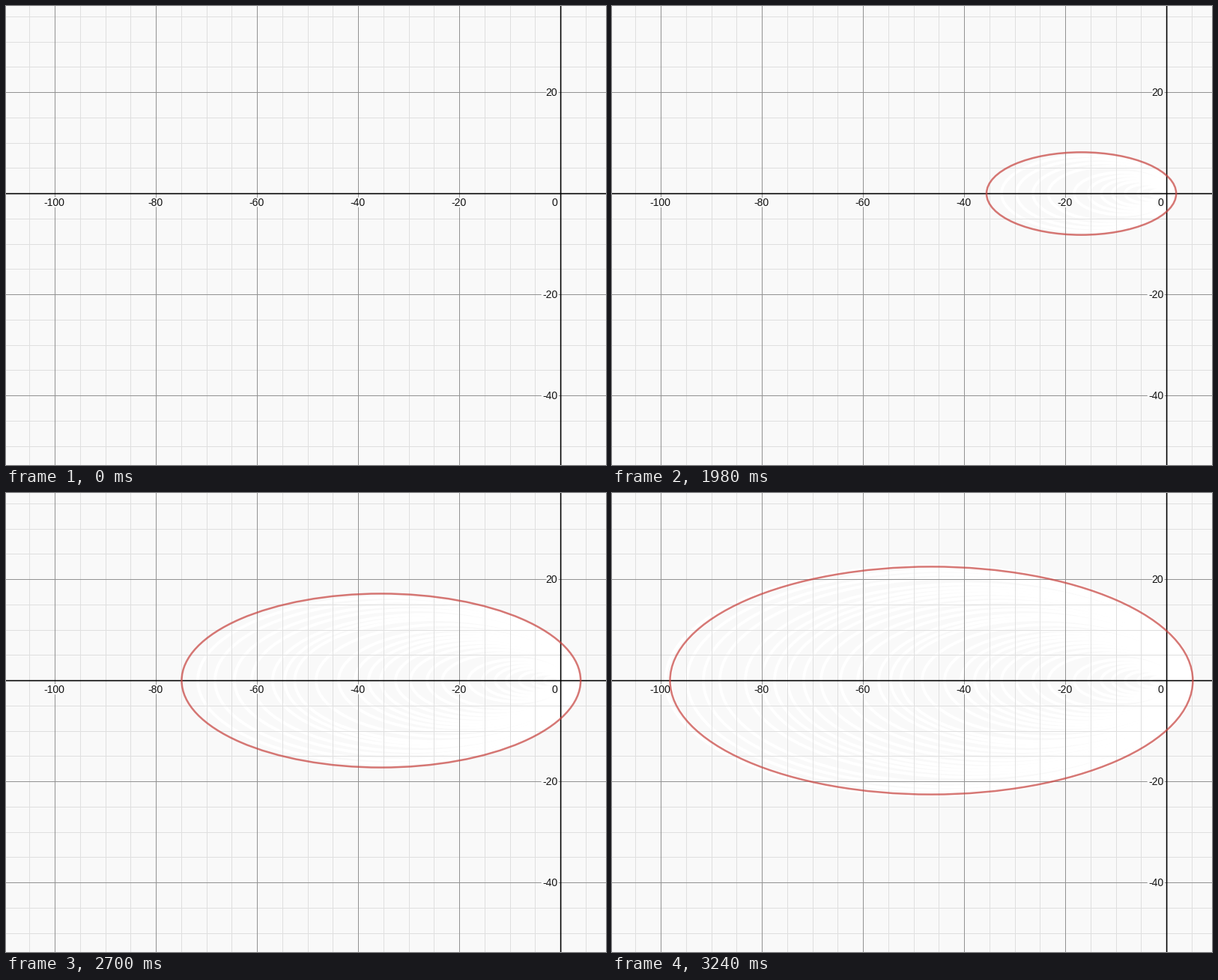
Animation of 801 by 613 pixels, one loop 3.3 s. Source, as a matplotlib script:

```python
import numpy as np
import matplotlib.pyplot as plt
from matplotlib.animation import FuncAnimation
from matplotlib.patches import Ellipse, Rectangle
from matplotlib.patheffects import Stroke

W, H, DPI = 801, 613, 64
PX = 72 / DPI                      # points per pixel
OX, OY, CELL = 740, 250, 33.75     # origin and minor grid step (5 units)
BG = "#f9f9f9"
STEP, TOTAL, START = 60, 55, 21
ECC = 0.9                          # one focus stays on the origin

# Left vertex of the ellipse at each step of the uneven slider.
LEFT = [736, 719, 702, 685, 668, 653, 636, 617, 582.5,
        562, 540, 520, 500, 484, 466, 444, 414, 385.5,
        372, 356, 328, 305, 279, 256, 234.5, 217, 199.5,
        178, 144, 122, 100, 78, 71.5, 77.5]

fig = plt.figure(figsize=(W / DPI, H / DPI), dpi=DPI, facecolor=BG)
ax = fig.add_axes([0, 0, 1, 1])
ax.set_xlim(0, W)
ax.set_ylim(H, 0)
ax.axis("off")


def bar(x, y, w, h, color, z):
    ax.add_patch(Rectangle((x, y), w, h, fc=color, lw=0, snap=False, zorder=z))


def grid():
    for k in range(-21, 2):
        x = int(np.floor(OX + CELL * k + 0.5))
        major = k % 4 == 0
        bar(x, 0, 1, H, "#929292" if major else "#dfdfdf", 3 if major else 2)
    for k in range(-7, 11):
        y = int(np.floor(OY + CELL * k + 0.5))
        major = k % 4 == 0
        bar(0, y, W, 1, "#929292" if major else "#dfdfdf", 3 if major else 2)
    bar(OX - 0.2, 0, 1.6, H, "#000000", 5)
    bar(0, OY - 0.2, W, 1.6, "#000000", 5)


def label(x, y, text, align):
    style = dict(family="Liberation Sans", fontsize=14 * PX, ha=align,
                 va="baseline")
    ax.text(x, y, text, color=BG, zorder=4, **style,
            path_effects=[Stroke(linewidth=4 * PX, foreground=BG)])
    ax.text(x, y, text, color="#111111", zorder=6, **style)


def shape(ellipse, left):
    far = OX + 0.5 - left
    a = far / (1 + ECC)
    ellipse.set_center((OX + 0.5 - ECC * a, OY + 0.5))
    ellipse.set_width(2 * a)
    ellipse.set_height(2 * a * np.sqrt(1 - ECC ** 2))


def outline(left, color, width, z, alpha=1):
    e = Ellipse((0, 0), 1, 1, fill=False, ec=color, lw=width * PX,
                alpha=alpha, zorder=z, visible=False)
    shape(e, left)
    return ax.add_patch(e)


grid()
for v in range(-100, 0, 20):
    label(OX + v * CELL / 5 - 0.9, 267, str(v), "center")
label(732.2, 267, "0", "center")
for v in (20, -20, -40):
    label(736.2, OY - v * CELL / 5 + 5, str(v), "right")

trails = [outline(x, "#ffffff", 4, 1) for x in LEFT]
curve = outline(LEFT[0], "#c74440", 2.5, 8, 0.72)


def update(i):
    n = i - START
    curve.set_visible(n >= 0)
    if n >= 0:
        shape(curve, LEFT[n])
    for j, t in enumerate(trails):
        t.set_visible(j < n)
    return [curve, *trails]


anim = FuncAnimation(fig, update, frames=TOTAL, interval=STEP, repeat=True,
                     repeat_delay=0, blit=False)
plt.show()
```
